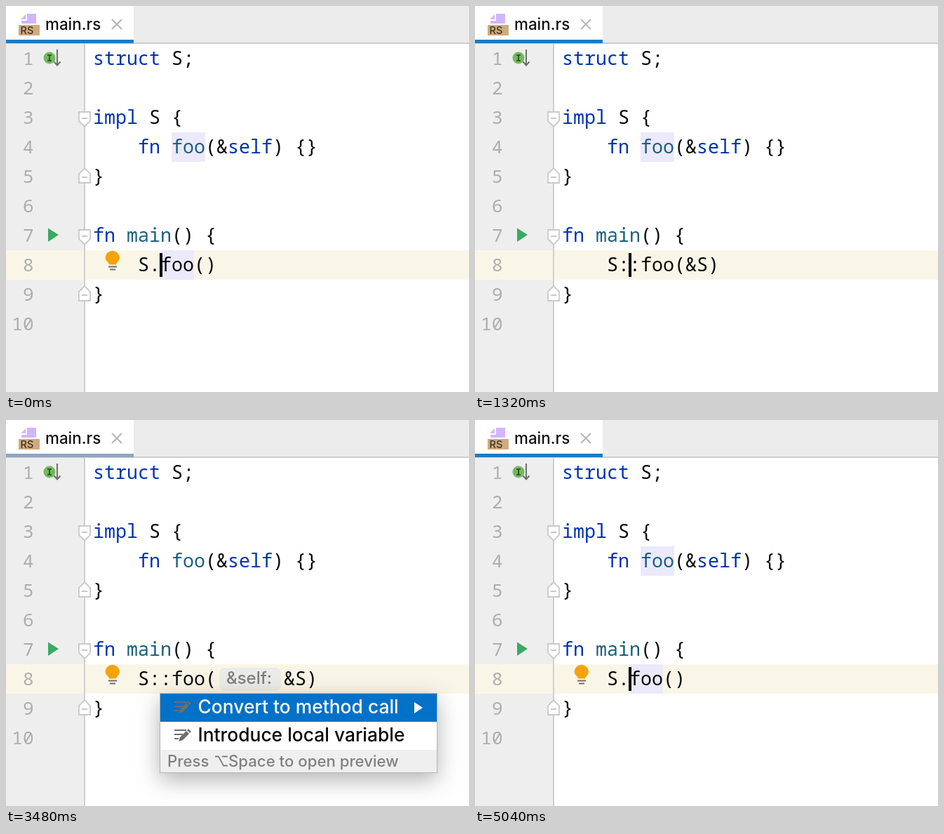
An HTML page that plays this animation: 660 px wide and 550 px high, repeating every 5100 ms.

```html
<!DOCTYPE html>
<html lang="en">
<head>
<meta charset="utf-8">
<title>Editor intention</title>
<style>
html, body { margin: 0; width: 100%; height: 100%; overflow: hidden; background: #fff; }
svg { display: block; width: 660px; height: 550px; }
text { font-family: Inter, "Open Sans", sans-serif; font-weight: 500; white-space: pre; }
.code text { font: 500 26.667px "Noto Sans Mono", "DejaVu Sans Mono", monospace; fill: #080808; }
.code .key { fill: #0033b3; }
.code .name { fill: #1b5f7d; }
.code .num { font-size: 26px; fill: #adadad; text-anchor: end; }
.line { fill: none; stroke: #6e6e6e; stroke-width: 2; }
.fold { fill: #fff; stroke: #c9c9c9; stroke-width: 1.8; }
.menu { filter: drop-shadow(0 10px 16px rgba(0,0,0,.3)); }
</style>
</head>
<body>
<svg viewBox="0 0 660 550">
  <defs>
    <g id="edit">
      <path class="line" d="M240-7h17M240-1h12M240 5h6"/>
      <path fill="#6e6e6e" d="M246 9l2-6 9-9 4 4-9 9zM258-7l2-2 4 4-2 2z"/>
    </g>
    <path id="foldDown" class="fold" d="M104-8h16v13l-8 8-8-8zM108 1h8"/>
    <path id="foldUp" class="fold" d="M104 9h16v-13l-8-8-8 8zM108 1h8"/>
  </defs>

  <rect width="660" height="550" fill="#fff"/>
  <rect y="53" width="112" height="497" fill="#eeeeee"/>
  <rect y="348" width="660" height="42" fill="#faf6e7"/>
  <path d="M112 53V550" stroke="#cfcfcf" stroke-width="2"/>

  <!-- tab bar -->
  <rect x="182" width="478" height="53" fill="#ececec"/>
  <path d="M0 53H660" stroke="#cdcdcd" stroke-width="2"/>
  <rect id="underline" y="48" width="182" height="5"/>
  <path fill="#d2b5fa" d="M30 11H43V25H22V21H30zM21 19L28 12V19z"/>
  <rect x="18" y="27" width="30" height="15" fill="#cfab80"/>
  <text x="20.5" y="40" font-size="14.5" fill="#40341f">RS</text>
  <text x="56" y="34" font-size="22.4" fill="#111">main.rs</text>
  <path d="M151 19l14 14M165 19l-14 14" stroke="#b3b3b3" stroke-width="1.8"/>

  <!-- gutter marks -->
  <circle cx="62" cy="74" r="8.5" fill="#72bb5c"/>
  <path d="M59 70h6M62 70v8M59 78h6" stroke="#2d4425" stroke-width="1.7"/>
  <path class="line" d="M73 62V84M68.5 79.5l4.5 5 4.5-5"/>
  <path d="M60 316.500V336L75 326z" fill="#38ab62"/>
  <use href="#foldDown" y="159"/>
  <use href="#foldUp" y="243"/>
  <use href="#foldDown" y="327"/>
  <use href="#foldUp" y="411"/>

  <g fill="#ece9fb">
    <rect id="declMark" x="236" y="180" width="48" height="42"/>
    <rect id="callMark" x="220" y="348" width="48" height="42"/>
  </g>
  <g id="code" class="code"></g>

  <g id="hint">
    <rect x="304" y="353" width="88" height="33" rx="8" fill="#ebebe7"/>
    <text x="314" y="376" font-size="24" fill="#7e7e7e">&amp;self:</text>
  </g>
  <g id="bulb">
    <path fill="#f4a30b" d="M147 368.500C147 365 141.500 364 141.500 358A10.300 10.300 0 0 1 162 358C162 364 157 365 157 368.500z"/>
    <path class="line" d="M146 371.500h12M148 375.500h8"/>
  </g>
  <rect id="caret" x="219" y="352" width="4" height="34" fill="#000"/>

  <g id="menu" class="menu">
    <rect x="219.500" y="389.500" width="395" height="113" fill="#fff" stroke="#b4b4b4"/>
    <rect x="220" y="390" width="394" height="40" fill="#0271c8"/>
    <rect x="220" y="470" width="394" height="32" fill="#efefef"/>
    <use href="#edit" y="409"/>
    <use href="#edit" y="449"/>
    <text id="action" x="273.5" y="418" font-size="26.4" fill="#fff"></text>
    <path d="M582 402V418L594 410z" fill="#fff"/>
    <text x="273.5" y="458" font-size="26.4" fill="#080808">Introduce local variable</text>
    <g fill="#808080" font-size="22.2">
      <text x="230" y="494">Press</text>
      <path d="M298 479.500h5l7 13h6M308 479.500h8" fill="none" stroke="#808080" stroke-width="1.8"/>
      <text x="317" y="494">Space to open preview</text>
    </g>
  </g>
</svg>
<script>
const LOOP = 5100, CELL = 16, LEFT = 124;
const $ = id => document.getElementById(id);

function put(row, x, str, cls = '') {
  const el = document.createElementNS('http://www.w3.org/2000/svg', 'text');
  el.setAttribute('x', x);
  el.setAttribute('y', 42 + 42 * row);
  el.setAttribute('class', cls);
  el.textContent = str;
  return $('code').appendChild(el);
}
const code = (row, col, str, cls) => put(row, LEFT + col * CELL, str, cls);

for (let n = 1; n <= 10; n++) put(n, 39.5, n, 'num');
code(1, 0, 'struct', 'key');
code(1, 7, 'S;');
code(3, 0, 'impl', 'key');
code(3, 5, 'S {');
code(4, 4, 'fn', 'key');
code(4, 7, 'foo', 'name');
code(4, 10, '(&');
code(4, 12, 'self', 'key');
code(4, 16, ') {}');
code(5, 0, '}');
code(7, 0, 'fn', 'key');
code(7, 3, 'main', 'name');
code(7, 7, '() {');
code(9, 0, '}');
const call = code(8, 4, ''), arg = code(8, 11, '&S)');

const show = (el, on) => el.style.display = on ? '' : 'none';

function draw(t) {
  const within = (from, to) => t >= from && t < to;
  const path = within(1260, 3600);
  const menu = within(480, 1260) || within(2760, 3600);
  const hint = within(1500, 3600);

  call.textContent = path ? 'S::foo(' : 'S.foo()';
  show(arg, path);
  arg.setAttribute('x', LEFT + (hint ? 17 : 11) * CELL);
  show($('hint'), hint);
  show($('bulb'), !within(1260, 1500) && !within(3600, 3720));
  show($('declMark'), !within(1680, 3960));
  show($('callMark'), !within(1260, 3960));
  show($('menu'), menu);
  $('action').textContent = path ? 'Convert to method call' : 'Convert to UFCS';
  $('underline').setAttribute('fill', menu || within(3600, 3660) ? '#90a4c2' : '#1a7bc6');
  const blinkOff = within(1680, 2160) || within(2640, 2760) || within(4500, 4980);
  show($('caret'), !menu && !blinkOff);
}

const start = performance.now();
function tick() {
  draw((performance.now() - start) % LOOP);
  requestAnimationFrame(tick);
}
tick();
</script>
</body>
</html>
```
